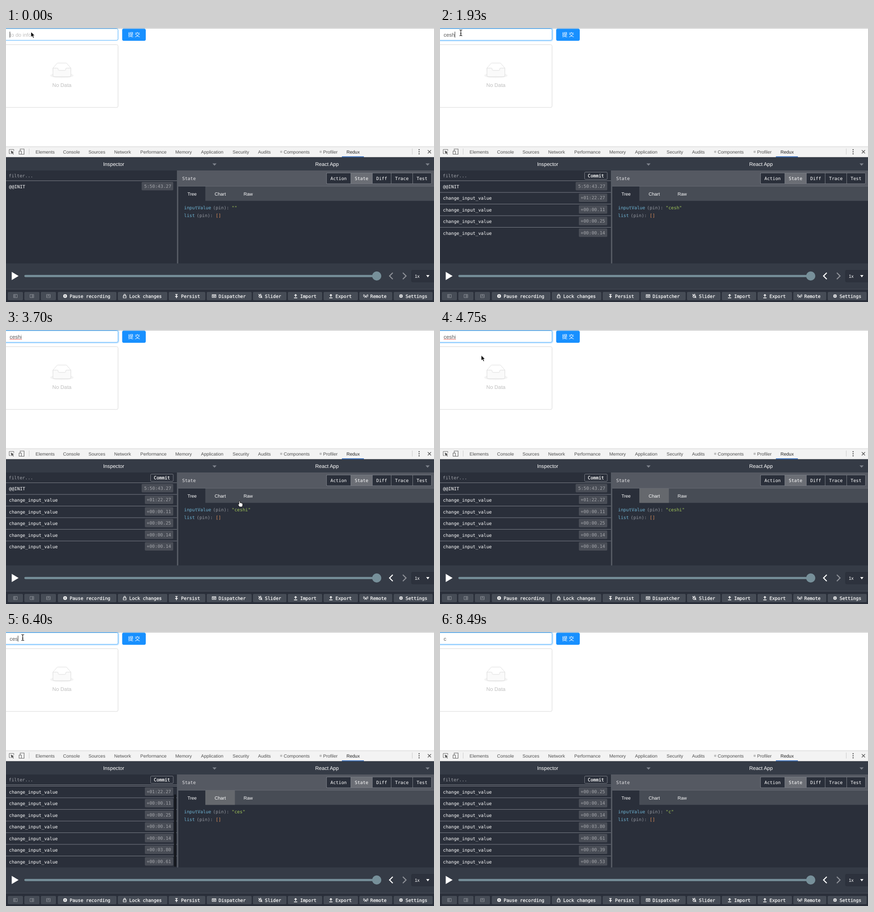
Recreate the animation shown at these times as an HTML page. Size 934x600 px, loop 8820 ms.

```html
<!DOCTYPE html>
<html lang="en">
<head>
<meta charset="utf-8">
<title>Todo state inspector</title>
<style>
  html, body { margin: 0; width: 100%; height: 100%; overflow: hidden; background: #fff; }
  svg { display: block; width: 934px; height: 600px; }
  text { font: 10px "Liberation Sans", Arial, sans-serif; white-space: pre; text-rendering: geometricPrecision; }
  .field { font-size: 11.4px; }
  .title { font-size: 11.2px; text-anchor: middle; fill: #fff; }
  .mid { text-anchor: middle; }
  .cjk { font: 12px "Noto Sans CJK SC", "Noto Sans CJK", sans-serif; text-anchor: middle; }
  .mono { font: 9.83px "DejaVu Sans Mono", Menlo, monospace; }
  .strong { stroke: #fff; stroke-width: .25px; }
  .line { fill: none; stroke: #fff; stroke-width: 1.2; }
</style>
</head>
<body>
<svg id="stage" viewBox="0 0 934 600" xmlns="http://www.w3.org/2000/svg"></svg>
<script>
const LOOP = 8820, ROW = 25.5, LIST_TOP = 334.5, LIST_HEIGHT = 181.5;

// Timelines: each entry holds from its time until the next one.
const values = [[0, ""], [1490, "c"], [1640, "ce"], [1780, "ces"], [1930, "cesh"], [2080, "ceshi"],
  [5800, "cesh"], [6400, "ces"], [6850, "ce"], [7300, "c"]];
const stamps = ["5:50:43.27", "+01:22.27", "+00:00.11", "+00:00.25", "+00:00.14", "+00:00.14",
  "+00:03.80", "+00:00.61", "+00:00.39", "+00:00.53"];
const carets = [[0, 1], [890, 0], [1490, 1], [2530, 0], [3850, 1], [4300, 0], [5350, 1], [7440, 0], [7890, 1], [8340, 0]];
const glows = [[0, 0], [150, .07], [300, .14], [450, .2]];
const pointers = [
  [0, "arrow", 54.5, 8.5], [150, "beam", 50, 11], [300, "beam", 46, 11], [450, "beam", 45.5, 10.5],
  [2530, "arrow", 62, 34], [2680, "arrow", 150, 150], [2830, "arrow", 270, 310], [2980, "arrow", 390, 430],
  [3120, "arrow", 480, 468], [3270, "arrow", 560, 440], [3410, "arrow", 582, 408], [3560, "arrow", 548, 390],
  [3700, "hand", 510, 375], [3850, "arrow", 532, 394], [4000, "arrow", 539, 408], [4150, "arrow", 530, 412],
  [4300, "arrow", 508, 400], [4450, "hand", 478, 372], [4600, "hand", 454, 350],
  [4750, "arrow", 90, 55.5], [4900, "arrow", 48, 28], [5050, "beam", 36, 12], [5350, "beam", 35, 12], [5500, "beam", 36.5, 12],
  [7890, "beam", 42, 13], [8040, "arrow", 180, 120], [8190, "arrow", 500, 330], [8340, "arrow", 905, 522], [8490, "none", 0, 0]];

const rect = (x, y, w, h, fill, more = "") => `<rect x="${x}" y="${y}" width="${w}" height="${h}" fill="${fill}" ${more}/>`;
const text = (x, y, s, fill, cls = "", more = "") => `<text x="${x}" y="${y}" fill="${fill}" class="${cls}" ${more}>${s}</text>`;
const mono = (x, y, s, fill = "#fff", more = "") => text(x, y, s, fill, "mono", more);
const path = (d, fill, more = "") => `<path d="${d}" fill="${fill}" ${more}/>`;
const stroke = (d, color, width = 1, more = "") => path(d, "none", `stroke="${color}" stroke-width="${width}" ${more}`);

function page() {
  return rect(0, 0, 934, 260, "#fff") + rect(0, 0, 934, 1, "#b9b9b9") +
    rect(-10, .5, 256, 27.5, "none", 'id="glow" rx="4" stroke="#1890ff" stroke-width="3"') +
    rect(-10, 1.5, 254.5, 25.5, "#fff", 'rx="3" stroke="#40a9ff"') +
    text(8, 19, "to do info", "#bfbfbf", "field", 'id="hint"') +
    text(8, 19, "", "#595959", "field", 'id="value"') +
    stroke("M8.5 20.5H35", "#e5534b", 1.5, 'id="spelling" stroke-dasharray="1.6 1"') +
    rect(8, 8, 1, 13, "#333", 'id="caret"') +
    rect(253.5, 1.5, 51.5, 26.5, "#1890ff", 'rx="3.5"') +
    text(279.5, 19.3, "提 交", "#fff", "cjk") +
    rect(-10, 36.5, 254.5, 137.5, "#fff", 'rx="3" stroke="#d9d9d9"') +
    `<g transform="translate(94.8 76.8) scale(.85)" stroke="#d9d9d9">
      <ellipse cx="32" cy="32" rx="30" ry="6.5" fill="#f3f3f3" stroke="none"/>` +
      path("M55 13 44.9 1.3Q44 0 42.9 0H21.1Q20 0 19.1 1.3L9 13V22H55Z", "#fff") +
      path("M41.6 16Q41.6 13 43.8 13H55V31Q55 35 52 35H12Q9 35 9 31V13H20.2Q22.4 13 22.4 16T24.6 18.9H39.4Q41.6 18.9 41.6 16Z", "#fafafa") +
    "</g>" + text(122, 129, "No Data", "#bfbfbf", "field mid");
}

function toolbar() {
  const tabs = [["Elements", 64.5], ["Console", 124.5], ["Sources", 180], ["Network", 236], ["Performance", 293],
    ["Memory", 369.5], ["Application", 425.5], ["Security", 494.5], ["Audits", 550], ["Components", 606],
    ["Profiler", 692], ["Redux", 743]];
  const atom = x => text(x, 274, "⚛", "#555", "", 'style="font:8px \'DejaVu Sans\',sans-serif"');
  return rect(0, 260, 934, 23, "#f3f3f3") + rect(0, 259.5, 934, 1, "#cfcfcf") + rect(0, 282, 934, 1, "#c8c8c8") +
    tabs.map(([s, x]) => text(x, 274.5, s, s === "Redux" ? "#222" : "#505050")).join("") +
    atom(597) + atom(683) + rect(733, 281, 48, 2, "#4272b8") +
    rect(50, 264, 1, 13, "#ccc") + rect(886, 264, 1, 13, "#ccc") +
    stroke("M10 275H7V266H17V269", "#666") + path("M10.5 268.5 17.5 272 14.7 273 17 276 16 277 13.5 274 12 276.5Z", "#555") +
    stroke("M31 269V265H39.5V276.5H34M28.5 269.5H33.5V276.5H28.5Z", "#666", 1.1) +
    [266.5, 271, 275.5].map(y => `<circle cx="901.5" cy="${y}" r="1.3" fill="#555"/>`).join("") +
    stroke("M920.5 267.5 927.5 274.5M927.5 267.5 920.5 274.5", "#555", 1.4);
}

function actionList() {
  const rows = stamps.map((stamp, i) => {
    const y = LIST_TOP + i * ROW, x = i ? 303 : 296;
    return `<g class="row">${i ? rect(0, y - .5, 373, 1, "#7b7f87") : ""}` +
      mono(6.5, y + 16, i ? "change_input_value" : "@@INIT") +
      rect(x, y + 2.5, 365 - x, 18.5, "#494d56", 'rx="2"') +
      mono(x + (i ? 4 : 5.5), y + 15, stamp, "#a3a5aa") + "</g>";
  }).join("");
  return rect(0, 312, 374, 204, "#2a2f3a") + mono(6, 327, "filter...", "#a0a3a9") +
    `<g id="commit">${rect(315.5, 315.5, 49.5, 16, "#2a2f3a", 'rx="2" stroke="#7b7f87"')}${text(322.5, 327, "Commit", "#fff", "mono strong")}</g>` +
    `<clipPath id="window"><rect x="0" y="335" width="374" height="180.5"/></clipPath>
     <g clip-path="url(#window)"><g id="rows">${rows}</g>${rect(366.5, 0, 5, 0, "#15181e", 'id="thumb" rx="2.5"')}</g>` +
    rect(0, 334, 373, 1, "#7b7f87") + rect(373, 312, 3, 204, "#555a63");
}

function statePanel() {
  const modes = [["Action", 699.5, 708], ["State", 752.5, 761], ["Diff", 799.5, 808], ["Trace", 840.5, 849], ["Test", 887.5, 896]];
  return rect(376, 312, 558, 204, "#2a2f3a") + rect(376, 312, 558, 34.5, "#555962") + mono(384.5, 332.5, "State", "#e4e4e6") +
    rect(699.5, 317.5, 229, 23.5, "#2a2f3a", 'rx="2"') + rect(752.5, 317.5, 47, 23.5, "#6b6e75") +
    modes.map(([s, x, tx]) => rect(x - .5, 317.5, 1, 23.5, "#777b83") + mono(tx, 332.5, s)).join("") +
    rect(699.5, 317.5, 229, 23.5, "none", 'rx="2" stroke="#777b83"') +
    rect(376, 346, 558, 32.5, "#474c55") + rect(376, 346, 558, 1, "#656972") + rect(376, 347, 59, 32, "#2a2f3a") +
    rect(435, 347, 64.5, 31.5, "#65686d", 'id="hover"') +
    [["Tree", 406], ["Chart", 467.5], ["Raw", 528.5]].map(([s, x]) => text(x, 366.5, s, "#fff", "mid")).join("") +
    mono(388.5, 397, "inputValue", "#6fb3d2") + mono(451.5, 397, "(pin):", "#9498a0") + mono(492.5, 397, "", "#a1c659", 'id="state"') +
    mono(388.5, 414, "list", "#6fb3d2") + mono(416, 414, "(pin):", "#9498a0") + mono(457.5, 414, "[]", "#e0905c");
}

function player() {
  return rect(0, 515.5, 934, 57, "#353b46") + path("M12.5 534 27.5 543 12.5 552Z", "#fff") +
    rect(40, 540.8, 769, 4.6, "#77909a", 'rx="2.3"') + '<circle cx="809" cy="543" r="10" fill="#77909a"/>' +
    stroke("M844 536 837 543 844 550", "#8e9198", 2.3, 'id="back"') + stroke("M866 536 873 543 866 550", "#8e9198", 2.3) +
    rect(885, 530.5, 60, 25.5, "#2d323d", 'rx="2" stroke="#292e38"') + text(892, 546.5, "1x", "#fff") +
    path("M917 541H924L920.5 546Z", "#fff");
}

function footer() {
  const arrowUp = "M-3.5 4H3.5M0 2V-3M-2.5-1 0-3.5 2.5-1";
  const buttons = [
    ["Pause recording", 113, 241, 139, "M-3 0A3 3 0 1 0 3 0A3 3 0 1 0-3 0M-1 0H1", 2.2],
    ["Lock changes", 244, 352, 269, "M-3-.5H3V4H-3ZM-1.8-.5V-2A1.8 1.8 0 0 1 1.8-2V-.5"],
    ["Persist", 355, 435, 382, "M-2.5-3.5H2.5M0-3V1M-3 1H3M0 1V4.5", 1.6],
    ["Dispatcher", 438, 536, 464, "M-4-2.8H4V3H-4ZM-2.8-1H3M-2 1.2H2"],
    ["Slider", 539, 612, 565, "M-3 .5A3 3 0 1 0 3 .5A3 3 0 1 0-3 .5M-4-4 4 4M-1-4H2"],
    ["Import", 615, 690, 642, arrowUp, 1.5], ["Export", 693, 768, 719, arrowUp, 1.5],
    ["Remote", 771, 843, 795, "M-2.5 4 0-1 2.5 4M-1.5 2H1.5M-2-3Q-3.5-1-2 1M2-3Q3.5-1 2 1M-4-4Q-6-1-4 2M4-4Q6-1 4 2", 1],
    ["Settings", 846, 931, 872, "M-2 0A2 2 0 1 0 2 0A2 2 0 1 0-2 0M0-4V-2M0 4V2M-4 0H-2M4 0H2M-3-3-1.5-1.5M3 3 1.5 1.5M-3 3-1.5 1.5M3-3 1.5-1.5", 1.5]];
  const layouts = ["M-4-3.5H4V3.5H-4ZM-1-3.5V3.5M-4 0H1", "M-4-3.5H4V3.5H-4ZM1-3.5V3.5M-1 0H4", "M-4-3.5H4V3.5H-4ZM-4 0H4M0-3.5V0"];
  const box = (x1, x2) => rect(x1, 578, x2 - x1, 18, "#464c56", 'rx="2"');
  const icon = (x, d, width, color) => stroke(d, color, width, `transform="translate(${x} 587)"`);
  return rect(0, 572, 934, 28, "#2a2f3a") + rect(0, 571.5, 934, 1, "#4d525c") +
    layouts.map((d, i) => box(4 + 36 * i, 37 + 36 * i) + icon(20.5 + 36 * i, d, 1, "#8b8f96")).join("") +
    buttons.map(([s, x1, x2, tx, d, w = 1.2]) => box(x1, x2) + icon(tx - 10, d, w, "#fff") + text(tx, 590.5, s, "#fff", "mono strong")).join("");
}

function cursors() {
  return `<g id="arrow">${path("M0 0V11.5L2.7 9 4.7 13.5 6.7 12.6 4.8 8.3H8.4Z", "#000", 'stroke="#fff" stroke-width=".9"')}</g>` +
    `<g id="beam">${stroke("M-3-6.5Q0-6.5 0-4.5Q0-6.5 3-6.5M0-4.5V4.5M-3 6.5Q0 6.5 0 4.5Q0 6.5 3 6.5M-1.5 1.5H1.5", "#111", 1.2)}</g>` +
    `<g id="hand">${path("M-1.8 1Q-1.8-.5-.6-.5T.8 1V4Q2-.2 3 4Q4.3 3 5 4.8Q6.6 4 6.6 6V8Q6.6 10 5.3 12.3H-.6Q-2 9.5-4 7.4Q-4.5 5.7-1.8 7Z", "#fff", 'stroke="#111" stroke-width="1"')}</g>`;
}

const stage = document.getElementById("stage");
stage.innerHTML = page() + toolbar() +
  rect(0, 283, 934, 29.5, "#353b46") + text(235, 302, "Inspector", "#fff", "title") + text(700.5, 302, "React App", "#fff", "title") +
  path("M450.5 296.5H459.5L455 301.5ZM915.5 296.5H924.5L920 301.5Z", "#7d828b") +
  actionList() + statePanel() + player() + footer() + cursors();

const $ = id => document.getElementById(id);
const show = (el, on) => el.setAttribute("visibility", on ? "visible" : "hidden");
const set = (el, attrs) => Object.entries(attrs).forEach(([k, v]) => el.setAttribute(k, v));
const current = (steps, t) => steps.filter(s => s[0] <= t).pop();
const rowEls = document.querySelectorAll(".row");

function render(t) {
  const value = current(values, t)[1];
  const count = values.filter(s => s[0] <= t).length;
  $("value").textContent = value;
  $("state").textContent = `"${value}"`;
  $("caret").setAttribute("x", 8 + (value ? $("value").getComputedTextLength() : 0));
  show($("caret"), current(carets, t)[1]);
  show($("hint"), !value);
  show($("spelling"), t >= 2530 && t < 5800);
  $("glow").setAttribute("stroke-opacity", current(glows, t)[1]);

  const scroll = Math.max(0, count * ROW - LIST_HEIGHT);
  rowEls.forEach((row, i) => row.style.display = i < count ? "" : "none");
  $("rows").setAttribute("transform", `translate(0 ${-scroll})`);
  const thumb = LIST_HEIGHT * LIST_HEIGHT / (count * ROW) - 3;
  set($("thumb"), { y: 514 - thumb, height: thumb });
  show($("thumb"), scroll && t < 8190);
  show($("commit"), count > 1);
  $("back").setAttribute("stroke", count > 1 ? "#fff" : "#8e9198");
  show($("hover"), t >= 4600 && t < 8190);

  const [, kind, x, y] = current(pointers, t);
  for (const id of ["arrow", "beam", "hand"]) {
    show($(id), id === kind);
    $(id).setAttribute("transform", `translate(${x} ${y})`);
  }
}

const start = performance.now();
function tick() {
  render((performance.now() - start) % LOOP);
  requestAnimationFrame(tick);
}
tick();
</script>
</body>
</html>
```
